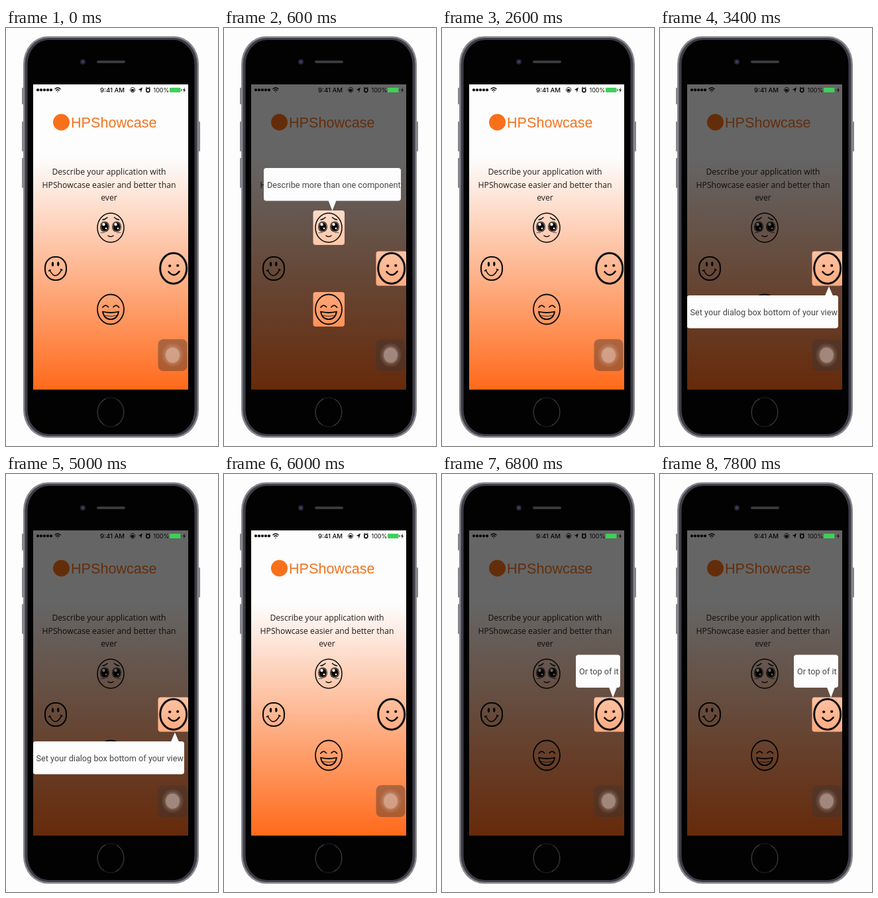
Recreate the animation shown at these times as an HTML page. Size 320 by 630 pixels, loop 8000 ms.

```html
<!DOCTYPE html>
<html lang="en">
<head>
<meta charset="utf-8">
<title>Showcase demo</title>
<style>
  html, body { margin: 0; width: 100%; height: 100%; overflow: hidden; background: #fdfdfd; }
  svg { display: block; width: 320px; height: 630px; }
  .ink { fill: none; stroke: #0d0b0a; stroke-linecap: round; stroke-linejoin: round; }
  .dark { fill: #0d0b0a; }
  .note { font: 12.2px "Open Sans", sans-serif; fill: #221d1b; text-anchor: middle; }
  .status { font: 500 9.6px Inter, sans-serif; fill: #0c0c0c; }
  .bubble { fill: #fdfdfd; }
  .label { font: 12.7px Roboto, sans-serif; fill: #474747; }
  .scene { opacity: 0; }
</style>
</head>
<body>
<svg viewBox="0 0 320 630">
  <defs>
    <linearGradient id="sky" gradientUnits="userSpaceOnUse" x1="0" y1="195" x2="0" y2="545">
      <stop offset="0" stop-color="#fdfdfd"/>
      <stop offset="1" stop-color="#ff6a1b"/>
    </linearGradient>
    <clipPath id="screen"><rect x="41" y="85" width="234" height="460"/></clipPath>
  </defs>

  <!-- phone body -->
  <g fill="#85858c">
    <rect x="24" y="90" width="4" height="25" rx="1"/>
    <rect x="24" y="141" width="4" height="45" rx="1"/>
    <rect x="24" y="196" width="4" height="45" rx="1"/>
    <rect x="289" y="141" width="4" height="45" rx="1"/>
  </g>
  <rect x="26" y="12.5" width="265" height="605" rx="37" ry="42" fill="#85858c"/>
  <rect x="28.5" y="15" width="260" height="600" rx="35" ry="40" fill="#3d3d46"/>
  <rect x="32.5" y="18" width="252" height="594" rx="32" ry="37" fill="#020203"/>
  <circle cx="116" cy="51" r="4" fill="#24243a"/>
  <circle cx="116" cy="51" r="1.8" fill="#45456a"/>
  <rect x="137" y="49" width="43" height="4" rx="2" fill="#39393e"/>
  <g class="ink" stroke-width="1.4">
    <ellipse cx="158" cy="579" rx="20" ry="22" style="stroke:#17171b"/>
    <path d="M150 559a20 22 0 0 0 -2 39M166 599a20 22 0 0 0 2 -39" style="stroke:#34343a"/>
  </g>

  <g clip-path="url(#screen)">
    <rect x="41" y="85" width="234" height="460" fill="url(#sky)"/>

    <!-- status bar -->
    <g id="signal" class="dark"></g>
    <g class="ink" stroke-width="1.5">
      <path d="M74 91.8q4-3.6 8 0M75.8 94q2.2-1.8 4.4 0"/>
      <path d="M78 96.2v.1"/>
    </g>
    <text class="status" x="142" y="97">9:41 AM</text>
    <g class="ink" stroke-width="1">
      <path d="M188 91.5a3.5 3.7 0 1 1 0 3.5M187 93.3h1.8"/>
      <rect x="190" y="92.6" width="2.6" height="2.4" class="dark"/>
      <ellipse cx="214.3" cy="93.7" rx="2.6" ry="2.9" stroke-width="1.6"/>
      <path d="M211.2 90.3l1.4-1M217.4 90.3l-1.4-1"/>
    </g>
    <path class="dark" d="M206 89.5l-2.3 8-.7-3.8-3.2-.6z"/>
    <text class="status" x="222.5" y="97" style="font-size:9px;font-weight:400">100%</text>

    <!-- heading -->
    <circle cx="83.5" cy="142" r="12.5" fill="#f9701a"/>
    <text x="98" y="150" font-family="Liberation Sans, sans-serif" font-size="21.6" fill="#f4731f">HPShowcase</text>
    <g class="note">
      <text x="155.5" y="220.5">Describe your application with</text>
      <text x="155.5" y="240.5">HPShowcase easier and better than</text>
      <text x="155.5" y="260">ever</text>
    </g>

    <!-- pleading face -->
    <g class="ink" stroke-width="1.5">
      <ellipse cx="158" cy="301" rx="20" ry="22"/>
      <path d="M146 289q4-.5 7-3.5M163.5 285.5q3 3 7 3.5M154 313q4 3.2 8 0"/>
      <path d="M143 308.5h5M168 308.5h5" stroke-width=".6"/>
    </g>
    <g id="eyes"></g>

    <!-- left face -->
    <g class="ink" stroke-width="2.1">
      <rect x="59" y="345" width="32" height="35" rx="15" ry="16"/>
      <path d="M66 365q8.5 17 18-.8M64.5 366l2.5-1.5M82.5 363.5l2.5 1.2" stroke-width="1.6"/>
    </g>
    <ellipse class="dark" cx="70.5" cy="356" rx="1.7" ry="3.4"/>
    <ellipse class="dark" cx="78.8" cy="355.6" rx="1.7" ry="3.4"/>

    <!-- right face -->
    <g class="ink" stroke-width="3">
      <ellipse cx="252.7" cy="362.3" rx="20" ry="23"/>
      <path d="M245.5 367.5q8 9.5 16-.5" stroke-width="2.6"/>
    </g>
    <circle class="dark" cx="247.2" cy="358.5" r="2.1"/>
    <circle class="dark" cx="259.2" cy="358" r="2.1"/>

    <!-- laughing face -->
    <g class="ink" stroke-width="1.8">
      <ellipse cx="158" cy="424" rx="20" ry="22.5"/>
      <path d="M146 421q4-5.5 8.5-.5M162 420.5q4.5-5 8.5.5"/>
      <path d="M146 427.5q12 3 24 0q-2 11.5-12 11.7q-10-.2-12-11.700z"/>
      <path d="M149 433.5q9 2 18 0" stroke-width=".8"/>
    </g>

    <g id="scenes"></g>

    <!-- battery and floating button stay above the dimming -->
    <rect x="247" y="90" width="16.5" height="7" rx="1" fill="#3fcf58"/>
    <path d="M265 92v3" stroke="#30503a" stroke-width="1.2"/>
    <path class="dark" d="M270 89.5l-3 4.5h1.8l-.8 3.5 3-4.5h-1.8z"/>
    <rect x="229.5" y="469" width="44" height="48" rx="8" fill="#3c3632" fill-opacity=".42"/>
    <g id="button" fill="#fff0e8"></g>
  </g>
</svg>
<script>
const LOOP = 8000;
const find = id => document.getElementById(id);

find('signal').innerHTML = [0, 1, 2, 3, 4]
  .map(i => `<circle cx="${48 + i * 5}" cy="93.3" r="2.1"/>`).join('');

find('eyes').innerHTML = [149, 167].map(x => `
  <ellipse class="dark" cx="${x}" cy="299.5" rx="7" ry="8"/>
  <ellipse cx="${x}" cy="299.5" rx="5.9" ry="6.9" fill="none" stroke="#f6dccf" stroke-width=".6"/>
  <circle cx="${x - 1.5}" cy="296" r="2.2" fill="#fff6f0"/>
  <circle cx="${x + 2}" cy="302" r="1.3" fill="#fff6f0"/>`).join('');

find('button').innerHTML = [[16, .08], [13, .12], [10.5, .32]]
  .map(([r, o]) => `<ellipse cx="251.5" cy="493" rx="${r}" ry="${r * 1.1}" fill-opacity="${o}"/>`).join('');

const roundRect = ([x, y, w, h], r = 4) =>
  `M${x + r} ${y}h${w - 2 * r}q${r} 0 ${r} ${r}v${h - 2 * r}q0 ${r} ${-r} ${r}` +
  `h${2 * r - w}q${-r} 0 ${-r} ${-r}v${2 * r - h}q0 ${-r} ${r} ${-r}z`;

const TOP = [134.5, 275, 47.5, 52];
const RIGHT = [229.5, 336.5, 47, 52];
const BOTTOM = [134.5, 398, 47.5, 52];

// each scene fades in at its start and is replaced by the next one at its end
const scenes = [
  { start: 0, end: 2600, holes: [TOP, RIGHT, BOTTOM],
    box: [60, 211, 207, 49.5], arrow: 'M157.5 260h12l-6 15.5z',
    text: 'Describe more than one component' },
  { start: 2600, end: 6000, holes: [RIGHT],
    box: [40.5, 403, 228.5, 49.5], arrow: 'M249 403.5h12l-6-14z',
    text: 'Set your dialog box bottom of your view' },
  { start: 6000, end: LOOP, holes: [RIGHT],
    box: [202, 272.5, 67, 49.5], arrow: 'M252 321.5h12l-6 15.5z',
    text: 'Or top of it' }
];

// [ms after the start, opacity]
const FADE_IN = [[0, 0], [200, .35], [400, .85], [600, 1]];

find('scenes').innerHTML = scenes.map(({ holes, box, arrow, text }) => `
  <g class="scene">
    <path d="M41 85h234v460h-234z${holes.map(h => roundRect(h)).join('')}"
      fill="#000" fill-opacity=".6" fill-rule="evenodd"/>
    <path class="bubble" d="${roundRect(box)}"/>
    <path class="bubble" d="${arrow}"/>
    <text class="label" x="${box[0] + 5}" y="${box[1] + 29.7}">${text}</text>
  </g>`).join('');

document.querySelectorAll('.scene').forEach((el, i) => {
  const { start, end } = scenes[i];
  const steps = [[0, 0], ...FADE_IN.map(([t, o]) => [start + t, o]), [end, 0], [LOOP, 0]];
  const frames = steps.map(([time, opacity]) =>
    ({ offset: time / LOOP, opacity, easing: 'steps(1, end)' }));
  el.animate(frames, { duration: LOOP, iterations: Infinity });
});
</script>
</body>
</html>
```
